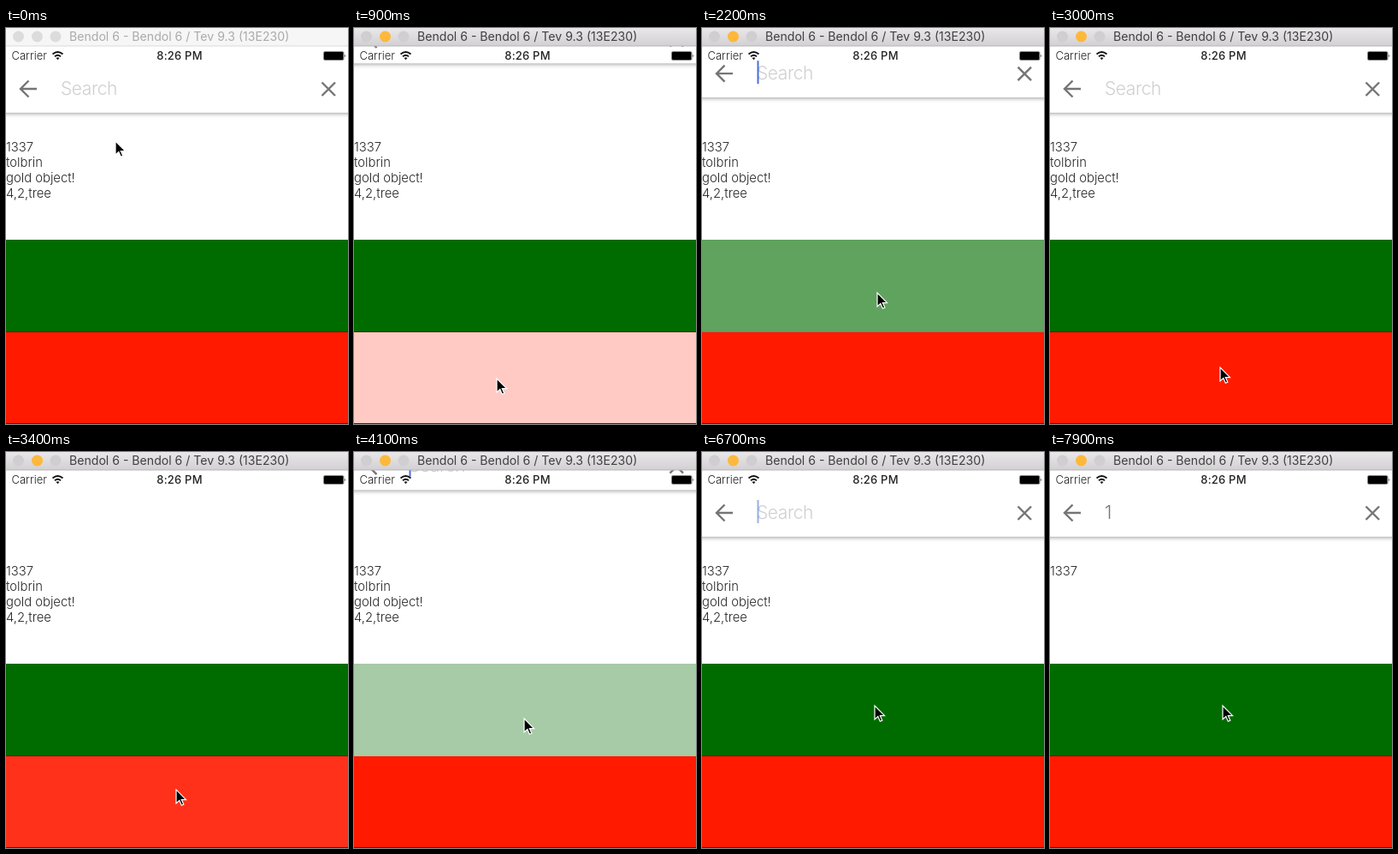
An HTML page that plays this animation: 400 by 462 pixels, repeating every 8 s.

```html
<!DOCTYPE html>
<html lang="en">
<head>
<meta charset="utf-8">
<title>Search bar demo</title>
<style>
  html, body { margin: 0; width: 100%; height: 100%; overflow: hidden; background: #fff; }
  svg { display: block; width: 400px; height: 462px; font-family: Inter, "Open Sans", sans-serif; }
  .panel { fill: #fff; filter: drop-shadow(0 1px 2.5px rgba(0, 0, 0, .4)); }
  .icon { fill: none; stroke: #757575; stroke-width: 2.4; }
  #query { font-size: 21px; font-weight: 300; letter-spacing: -.4px; }
  .list { font-size: 14.8px; font-weight: 350; fill: #262626; }
  .status { font-size: 13px; fill: #222; }
  #title { font-size: 14.1px; }
</style>
</head>
<body>
<svg viewBox="0 0 400 462">
  <defs>
    <linearGradient id="chrome" x2="0" y2="1">
      <stop stop-color="#e9e7e9"/><stop offset="1" stop-color="#d2d0d2"/>
    </linearGradient>
  </defs>
  <rect width="400" height="462" fill="#fff"/>

  <g class="list">
    <text y="143.5">1337</text>
    <g id="rest">
      <text y="161.7">tolbrin</text>
      <text y="180">gold object!</text>
      <text y="198.2">4,2,tree</text>
    </g>
  </g>
  <rect id="red" y="355" width="400" height="107" fill="#ff1a00"/>
  <g id="green">
    <rect y="247" width="400" height="107" fill="#006c00"/>
    <rect y="354" width="400" height="1" fill="#3f3000"/>
  </g>
  <rect y="461" width="400" height="1" fill="#5c1410"/>

  <g id="bar">
    <rect class="panel" x="-6" y="-40" width="412" height="138.8"/>
    <path class="icon" d="M36 71H17.5M26.5 61.5L17 71L26.5 80.5"/>
    <path class="icon" d="M369.5 63.5L385 79M385 63.5L369.5 79"/>
    <text id="query" x="64" y="77.7"></text>
    <rect id="caret" y="56" width="2" height="27" fill="#476edb"/>
  </g>

  <g class="status">
    <text x="6.5" y="37" font-weight="350">Carrier</text>
    <text x="203" y="37" text-anchor="middle" font-weight="500" letter-spacing=".2">8:26 PM</text>
    <path d="M54.5 30.5Q60.5 25.5 66.5 30.5M57 33.2Q60.5 30.3 64 33.2"
          fill="none" stroke="#111" stroke-width="1.8"/>
    <path d="M58.5 35Q60.5 33.3 62.5 35L60.5 37.2Z"/>
    <rect x="371.5" y="27.5" width="23.5" height="10" rx="1.5" fill="none" stroke="#555" stroke-width=".7"/>
    <rect x="372" y="28" width="22.5" height="9" rx="1" fill="#000"/>
    <path d="M396 30.8Q397.8 32.5 396 34.2Z"/>
  </g>

  <rect id="top" width="400" height="21"/>
  <rect id="edge" y="20.5" width="400" height="1"/>
  <g id="dots">
    <circle cx="14.5" cy="10" r="6.5"/>
    <circle id="middle" cx="36.5" cy="10" r="6.5"/>
    <circle cx="58" cy="10" r="6.5"/>
  </g>
  <text id="title" x="74" y="15">Bendol 6 - Bendol 6 / Tev 9.3 (13E230)</text>

  <path id="pointer" d="M0 0V16L3.8 12.5L6.3 18.3L8.8 17.2L6.3 11.6H11.5Z"
        fill="#000" stroke="#fff" stroke-width="1.2"/>
</svg>
<script>
const LOOP = 8000, HIDDEN = -85, ACTIVE_AT = 720, TYPED_AT = 7050;
const hides = [777, 3120], shows = [2060, 4020];
const $ = id => document.getElementById(id);
const set = (id, attrs) => {
  for (const name in attrs) $(id).setAttribute(name, attrs[name]);
};

// Eased value at time t from [time, value] keys.
function tween(t, keys) {
  const next = keys.findIndex(key => key[0] > t);
  if (next === 0) return keys[0][1];
  if (next < 0) return keys[keys.length - 1][1];
  const [t0, a] = keys[next - 1], [t1, b] = keys[next];
  const u = (t - t0) / (t1 - t0);
  return a + (b - a) * u * u * (3 - 2 * u);
}

const press = release => [[release - 140, 1], [release - 20, .2], [release, .2], [release + 240, 1]];
const redKeys = hides.flatMap(t => press(t + 95));
const greenKeys = shows.flatMap(t => press(t + 16));
const barKeys = [
  [hides[0], 0], [hides[0] + 200, HIDDEN], [shows[0], HIDDEN], [shows[0] + 200, 0],
  [hides[1], 0], [hides[1] + 200, HIDDEN], [shows[1], HIDDEN], [shows[1] + 200, 0]
];
const path = [
  [50, 128, 132], [700, 167, 409], [1350, 167, 409], [1850, 205, 309], [2350, 205, 309],
  [2900, 199, 396], [3350, 199, 396], [3900, 199, 311], [4250, 199, 311], [4750, 202, 296]
];
const xKeys = path.map(([t, x]) => [t, x]);
const yKeys = path.map(([t, , y]) => [t, y]);
const blink = [[0, .1], [200, 1], [560, 1], [820, 0], [980, 0], [1000, .1]];

function caretAlpha(t) {
  if (t < shows[0] || (t >= hides[1] && t < shows[1])) return 0;
  const start = t >= TYPED_AT ? TYPED_AT : t >= shows[1] ? shows[1] : shows[0];
  const age = t - start;
  return tween(age < 200 ? 200 : age % 1000, blink);
}

function draw(t) {
  const active = t >= ACTIVE_AT, typed = t >= TYPED_AT;
  set('top', { fill: active ? 'url(#chrome)' : '#f6f6f6' });
  set('edge', { fill: active ? '#b8b6b8' : '#dcdcdc' });
  set('dots', { fill: active ? '#d0ced0' : '#dcdcdc' });
  set('middle', { fill: active ? '#fdb83c' : '#dcdcdc' });
  set('title', { fill: active ? '#404040' : '#aaa' });

  set('red', { opacity: tween(t, redKeys) });
  set('green', { opacity: tween(t, greenKeys) });
  set('bar', { transform: `translate(0 ${tween(t, barKeys)})` });
  set('rest', { opacity: typed ? 0 : 1 });
  set('query', { fill: typed ? '#757575' : '#cfcfcf' });
  $('query').textContent = typed ? '1' : 'Search';
  set('caret', { x: typed ? 74.5 : 64.5, opacity: caretAlpha(t) });
  set('pointer', { transform: `translate(${tween(t, xKeys)} ${tween(t, yKeys)})` });
}

const begin = performance.now();
function frame() {
  draw((performance.now() - begin) % LOOP);
  requestAnimationFrame(frame);
}
frame();
</script>
</body>
</html>
```
